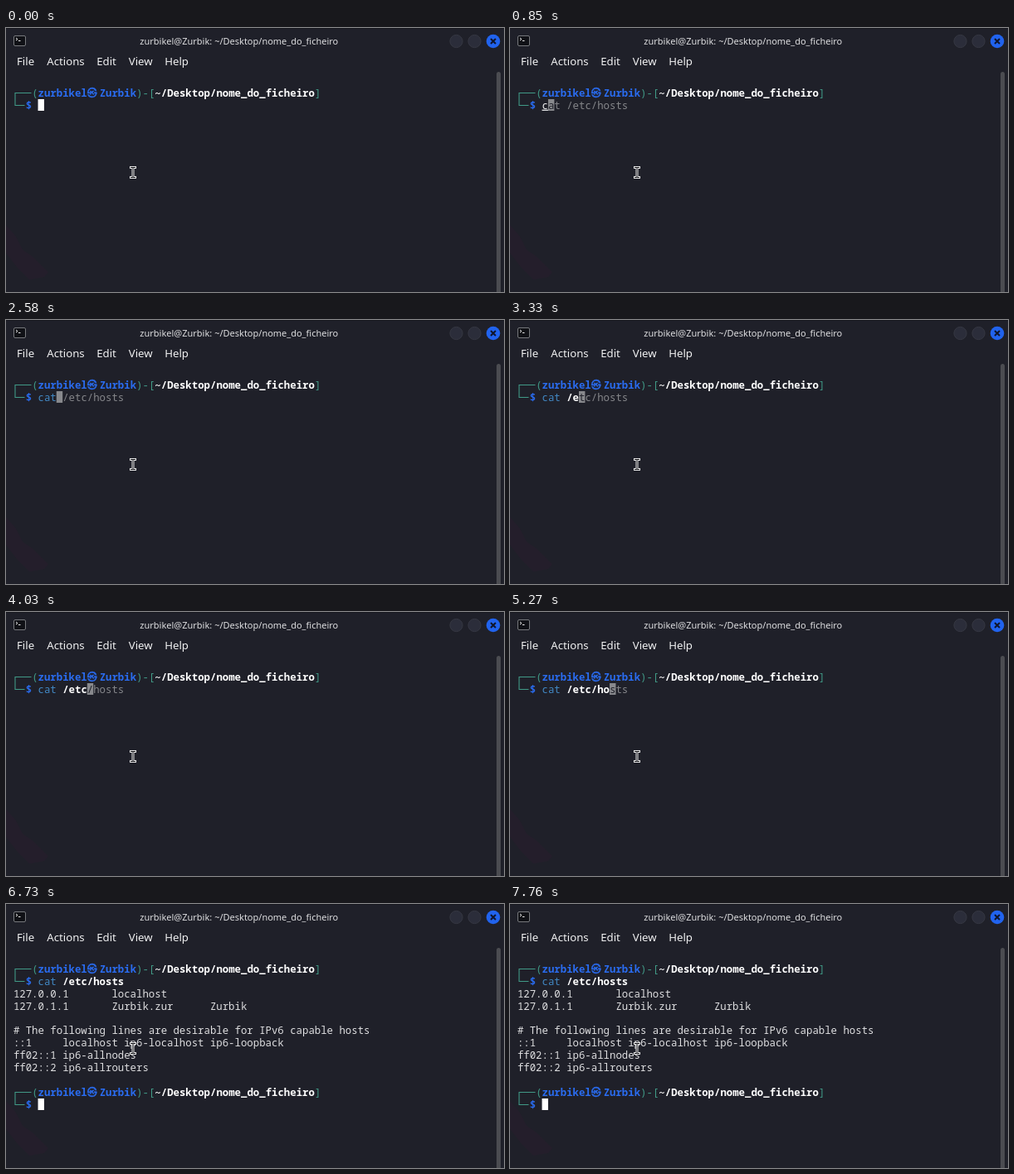
Write an HTML page that moves like this. It is 600 px wide and 319 px high and loops after 7790 ms.

```html
<!DOCTYPE html>
<html lang="pt">
<head>
<meta charset="utf-8">
<title>Terminal</title>
<style>
html, body { margin: 0; width: 100%; height: 100%; overflow: hidden; background: #1f2029; }
svg { display: block; }
text { white-space: pre; fill: #dedee0; }
.ui { font-family: "Noto Sans", "Open Sans", sans-serif; font-weight: 500; }
.menu { font-size: 13.2px; fill: #f1f1f2; }
.title { font-size: 11px; }
.mono { font-family: "Noto Sans Mono", "DejaVu Sans Mono", monospace; font-size: 12.35px; }
.teal { fill: #419a87; }
.blue { fill: #2a6cf0; font-weight: 700; }
.sign { font-family: "Noto Sans CJK JP", "Noto Sans CJK KR", "Noto Sans CJK", sans-serif; font-size: 12px; stroke: #2a6cf0; stroke-width: .4; }
.bold { fill: #fff; font-weight: 700; }
.cmd { fill: #4288c4; }
.part { fill: #f1f1f2; text-decoration: underline; }
.hint { fill: #85868a; }
.under { fill: #20212a; }
</style>
</head>
<body>
<svg width="600" height="319" viewBox="0 0 600 319">
  <path d="M0 238L12 252L20 268L32 276L51 295L46 301L28 304L14 290L0 272Z" fill="#261e2c" opacity=".8"/>
  <rect width="600" height="1" fill="#17181e"/>
  <rect x="9.5" y="9.5" width="14" height="12" rx="1.5" fill="#101116" stroke="#77797d"/>
  <path d="M12 12l2 1.5l-2 1.5M15 15.5h2.5" fill="none" stroke="#eee"/>
  <text class="ui title" x="161.3" y="19.6">zurbikel@Zurbik: ~/Desktop/nome_do_ficheiro</text>
  <g fill="#2b2d3a" stroke="#363843">
    <circle cx="542.5" cy="16" r="7.6"/>
    <circle cx="564.5" cy="16" r="7.6"/>
  </g>
  <circle cx="587" cy="16" r="8.3" fill="#2163ee"/>
  <path d="M584 13l6 6m0-6l-6 6" stroke="#10152a" stroke-width="2"/>
  <g id="menu"></g>
  <rect x="591" y="53" width="5" height="270" rx="2.5" fill="#4b4c51"/>
  <g id="top"></g>
  <g id="line"></g>
  <g id="output"></g>
  <g fill="none" stroke-linecap="square">
    <path id="beam" d="M150.5 168.5h5M153 168.5v12M150.5 180.5h5" stroke="#e8e8e8" stroke-width="3"/>
    <path d="M150.5 168.5h5M153 168.5v12M150.5 180.5h5" stroke="#14151b"/>
  </g>
</svg>
<script>
const LOOP = 7790, CELL = 7.41, ROW = 14.9, LEFT = 8.9, BASE = 82.8;
const COMMAND = "cat /etc/hosts";
const KEYS = [700, 1250, 1850, 2650, 2950, 3250, 3550, 3850, 4150, 4600, 5000, 5450, 5800, 6200];
const ENTER = 6700;
const $ = id => document.getElementById(id);
const colX = col => LEFT + col * CELL;

const put = (row, col, text, cls = "") =>
  `<text class="mono ${cls}" x="${colX(col)}" y="${BASE + row * ROW}">${text}</text>`;

const block = (row, col, fill) =>
  `<rect x="${colX(col)}" y="${86 + (row - 1) * ROW}" width="${CELL}" height="14" fill="${fill}"/>`;

function prompt(row) {
  const y = 78.5 + row * ROW;
  return `<path d="M30.5 ${y}H11V${y + 15}H22.5" fill="none" stroke="#419a87" stroke-width="1.1"/>` +
    put(row, 3, "(", "teal") + put(row, 4, "zurbikel", "blue") +
    put(row, 12, "㉿", "blue sign") + put(row, 14, "Zurbik", "blue") +
    put(row, 20, ")-[", "teal") + put(row, 23, "~/Desktop/nome_do_ficheiro", "bold") +
    put(row, 49, "]", "teal") + put(row + 1, 2, "$", "blue");
}

function commandLine(count, entered) {
  const word = COMMAND.slice(0, Math.min(count, 3));
  let out = put(1, 4, word, count < 3 ? "part" : "cmd");
  if (count > 4) out += put(1, 8, COMMAND.slice(4, count), "bold");
  if (entered) return out;
  const hinted = count > 0 && count < COMMAND.length;
  out += block(1, 4 + count, hinted ? "#88898d" : "#fff");
  if (hinted) {
    out += put(1, 4 + count, COMMAND[count], "under") +
      put(1, 5 + count, COMMAND.slice(count + 1), "hint");
  }
  return out;
}

$("menu").innerHTML = [["File", 13], ["Actions", 49.3], ["Edit", 109.2], ["View", 147.8], ["Help", 191.2]]
  .map(([name, x]) => `<text class="ui menu" x="${x}" y="45.1">${name}</text>`).join("");
$("top").innerHTML = prompt(0);
$("output").innerHTML = [
  "127.0.0.1       localhost",
  "127.0.1.1       Zurbik.zur      Zurbik",
  "",
  "# The following lines are desirable for IPv6 capable hosts",
  "::1     localhost ip6-localhost ip6-loopback",
  "ff02::1 ip6-allnodes",
  "ff02::2 ip6-allrouters"
].map((text, i) => put(i + 2, 0, text)).join("") + prompt(10) + block(11, 4, "#fff");

let shown = "";
const start = performance.now();
function draw() {
  const t = (performance.now() - start) % LOOP;
  const count = KEYS.filter(key => key <= t).length;
  const entered = t >= ENTER;
  const state = count + "," + entered;
  if (state !== shown) {
    shown = state;
    $("line").innerHTML = commandLine(count, entered);
    $("output").style.display = entered ? "" : "none";
  }
  requestAnimationFrame(draw);
}
draw();
</script>
</body>
</html>
```
